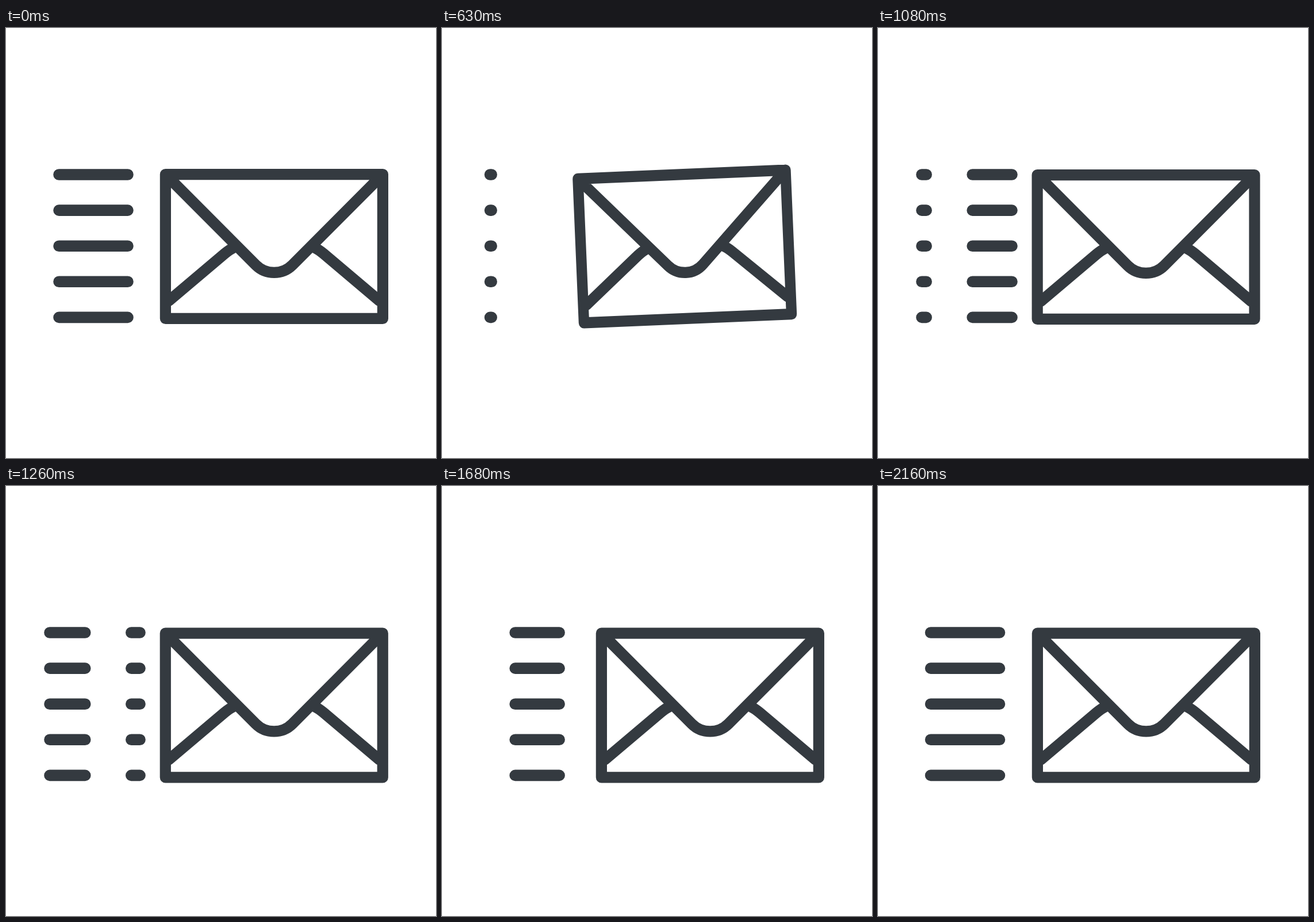
Recreate the animation shown at these times as an HTML page with a canvas. Size 748 px wide and 748 px high, loop 4190 ms.

```html
<!DOCTYPE html>
<html lang="en">
<head>
<meta charset="utf-8">
<title>Sending mail</title>
<style>
  html, body { margin: 0; width: 100%; height: 100%; overflow: hidden; background: #fff; }
  canvas { display: block; width: 748px; height: 748px; }
</style>
</head>
<body>
<canvas id="stage" width="748" height="748"></canvas>
<script>
const ctx = document.getElementById('stage').getContext('2d');
const SIZE = 748, LOOP = 4190, STEP = 30, END = 2160;
const INK = '#343a40';

const clamp = v => Math.min(1, Math.max(0, v));
const mix = (a, b, k) => a + (b - a) * k;
const smooth = (t, from, to) => {
  const u = clamp((t - from) / (to - from));
  return u * u * (3 - 2 * u);
};
// Fast start with a long, slow tail
const settle = t => t <= 0 ? 0 : 1 - 1 / (1 + Math.pow(t / 60, 2.86));

function drawEnvelope(t) {
  const pull = settle(t) - settle(t - 540);
  const w = 189, h = 125.4;

  ctx.save();
  ctx.translate(466.4 - 186 * pull, 380 + 1.5 * smooth(t, 900, 1200));
  ctx.rotate(-10.15 * pull * Math.PI / 180);
  ctx.scale(1 - 0.185 * pull, 1);
  ctx.lineWidth = 19.2;

  ctx.beginPath();
  ctx.rect(-w, -h, 2 * w, 2 * h);

  // Flap
  ctx.moveTo(-w, -h);
  ctx.arcTo(0, w - h + 0.6, w, -h, 45);
  ctx.lineTo(w, -h);

  // Lower folds
  for (const side of [-1, 1]) {
    ctx.moveTo(side * 183, 94.5);
    ctx.lineTo(side * 86, 12.5);
    ctx.quadraticCurveTo(side * 78, 6, side * 72, 3);
  }
  ctx.stroke();
  ctx.restore();
}

// Ends of the dash as fractions of its track; values outside 0..1 wrap round
function dashAt(t) {
  if (t < 600) return [0.102, mix(0.866, 0.102, smooth(t, 0, 180))];
  const right = 1.091 - 4.23 * smooth(t, 555, 2180);
  const length = 0.49 * smooth(t, 600, 870) + 0.274 * smooth(t, 1680, END);
  return [right - length, right];
}

function drawLines(t) {
  const [a, b] = dashAt(t);
  if (b - a < 0.001) return;
  const x = p => 76 + 157 * p;

  ctx.lineWidth = 19.6;
  ctx.beginPath();
  for (let k = Math.floor(a); k < b; k++) {
    const from = x(Math.max(a, k) - k), to = x(Math.min(b, k + 1) - k);
    for (let i = 0; i < 5; i++) {
      const y = 255 + 62.1 * i;
      ctx.moveTo(from, y);
      ctx.lineTo(to, y);
    }
  }
  ctx.stroke();
}

function draw(now) {
  const t = Math.min(END, Math.floor((now % LOOP) / STEP) * STEP);
  ctx.fillStyle = '#fff';
  ctx.fillRect(0, 0, SIZE, SIZE);
  ctx.strokeStyle = INK;
  ctx.lineCap = ctx.lineJoin = 'round';
  drawLines(t);
  drawEnvelope(t);
}

const start = performance.now();
function tick() {
  draw(performance.now() - start);
  requestAnimationFrame(tick);
}
tick();
</script>
</body>
</html>
```
